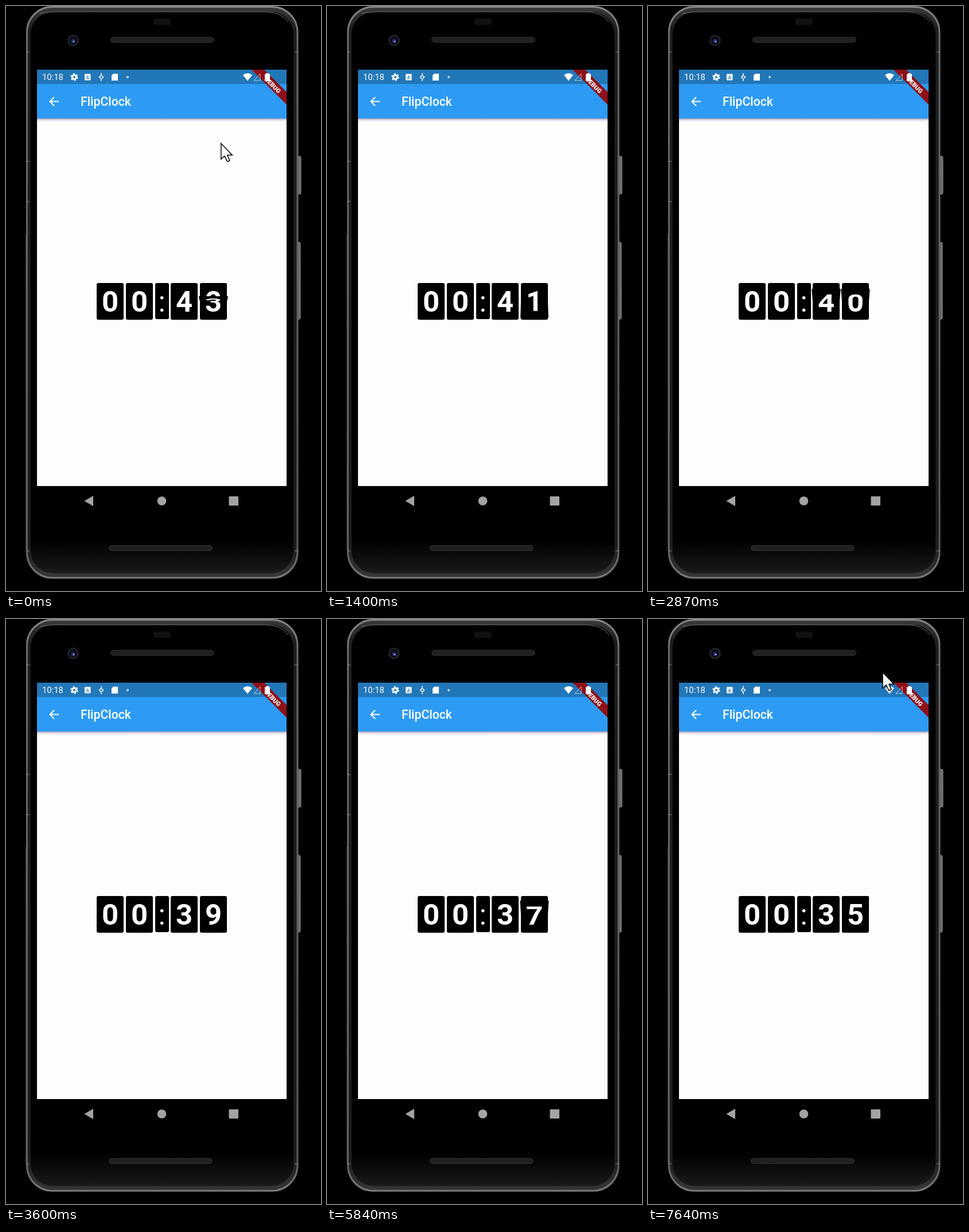
An HTML page for the animation above (7680 ms loop, 549 by 1020 pixels).

```html
<!DOCTYPE html>
<html lang="en">
<head>
<meta charset="utf-8">
<title>FlipClock</title>
<style>
  html, body { margin: 0; width: 100%; height: 100%; overflow: hidden; background: #000; }
  #stage { position: absolute; left: 0; top: 0; width: 549px; height: 1020px; overflow: hidden; }
  svg { position: absolute; left: 0; top: 0; }
  svg text { font-family: Roboto, sans-serif; fill: #fff; }
  .card { position: absolute; top: 483px; width: 47px; height: 64px; }
  .card.colon { width: 23.5px; }
  .half {
    position: absolute; left: 0; width: 100%; height: 32px; overflow: hidden;
    background: #000; color: #fff; text-align: center;
    font: bold 50.8px/66px Roboto, sans-serif;
  }
  .half span { display: block; }
  .top { top: 0; border-radius: 3px 3px 0 0; transform-origin: 50% 100%; }
  .bottom { top: 32px; border-radius: 0 0 3px 3px; transform-origin: 50% 0; }
  .bottom span { margin-top: -32px; }
  .colon .half { font-weight: 400; }
  .colon .bottom { height: 31px; }
</style>
</head>
<body>
<div id="stage">
  <svg width="549" height="1020" viewBox="0 0 549 1020">
    <defs>
      <linearGradient id="rim" x1="0" y1="0" x2="0" y2="1">
        <stop offset="0" stop-color="#868686"/>
        <stop offset=".06" stop-color="#6a6a6a"/>
        <stop offset=".5" stop-color="#626264"/>
        <stop offset=".94" stop-color="#5c5c5c"/>
        <stop offset="1" stop-color="#7a7a7a"/>
      </linearGradient>
      <linearGradient id="body" x1="0" y1="0" x2="0" y2="1">
        <stop offset="0" stop-color="#3a3a3a"/>
        <stop offset=".04" stop-color="#1c1c1c"/>
        <stop offset=".94" stop-color="#1a1a1a"/>
        <stop offset="1" stop-color="#383838"/>
      </linearGradient>
      <linearGradient id="glass" x1="0" y1="0" x2="0" y2="1">
        <stop offset=".94" stop-color="#000"/>
        <stop offset="1" stop-color="#1a1a1a"/>
      </linearGradient>
      <linearGradient id="shade" x1="0" y1="0" x2="0" y2="1">
        <stop offset="0" stop-color="#9a95b4"/>
        <stop offset=".4" stop-color="#dcd8e4"/>
        <stop offset="1" stop-color="#fdfdfb"/>
      </linearGradient>
      <clipPath id="screen"><path d="M54 111H489V837H54Z"/></clipPath>
    </defs>

    <!-- phone -->
    <g fill="#6c6c70" stroke="#8a8a8c" stroke-width="1">
      <rect x="507" y="262" width="7" height="66" rx="2"/>
      <rect x="507" y="412" width="6" height="134" rx="2"/>
    </g>
    <rect x="36.500" y="1.500" width="471.500" height="995.500" rx="44" fill="url(#body)" stroke="url(#rim)" stroke-width="3"/>
    <rect x="42" y="10" width="460" height="979" rx="40" fill="url(#glass)" stroke="#2a2a2a"/>
    <path d="M60 13Q75 10 95 10H450Q480 10 492 28" fill="none" stroke="#707070"/>
    <path d="M35 80h6M35 271h6M35 341h6M35 950h6M503 80h6M503 950h6" stroke="#888"/>
    <path d="M35 397V950" stroke="#666"/>
    <rect x="257" y="22" width="30" height="11" rx="3" fill="#111114"/>
    <g fill="#202020" stroke="#303030">
      <rect x="182.500" y="54.500" width="180" height="9" rx="4.500"/>
      <rect x="179.500" y="940.500" width="180" height="9" rx="4.500"/>
    </g>
    <circle cx="117" cy="60" r="10" fill="#222226"/>
    <circle cx="117" cy="60" r="7" fill="#0a0a18"/>
    <circle cx="117" cy="61" r="3.500" fill="#2a2c70"/>
    <circle cx="118" cy="62" r="1.200" fill="#c4c8ee"/>

    <!-- screen -->
    <g clip-path="url(#screen)">
      <path d="M54 111H489V837H54Z" fill="#fdfdfb"/>
      <path d="M54 111H489V196H54Z" fill="#2d9bf3"/>
      <path d="M54 196H489V202H54Z" fill="url(#shade)"/>
      <path d="M54 111H489V136H54Z" fill="#2277b8"/>
      <path d="M428 111H450L489 150V172Z" fill="#8e1019"/>
      <text x="465" y="142" transform="rotate(45 465 138)" text-anchor="middle" font-size="10.800" font-weight="900">DEBUG</text>
    </g>
    <path d="M92 166.500H77M84 159l-7.500 7.500 7.500 7.500" fill="none" stroke="#fff" stroke-width="2"/>
    <text x="130" y="174" font-size="21.200" font-weight="500">FlipClock</text>

    <!-- status bar -->
    <text x="63" y="129" font-size="14.800">10:18</text>
    <g fill="none" stroke="#fff">
      <circle cx="119" cy="124" r="3.500" stroke-width="3"/>
      <circle cx="119" cy="124" r="5.500" stroke-width="2.400" stroke-dasharray="2.880"/>
      <path d="M166 117v4M166 127v4M166 121l3.500 3-3.500 3-3.500-3Z" stroke-width="1.500"/>
      <path d="M432 130L443 118V130Z" stroke-opacity=".65"/>
    </g>
    <g fill="#fff">
      <rect x="137" y="118.500" width="10.500" height="11" rx="1"/>
      <path d="M187 118h8v12h-11v-9Z"/>
      <circle cx="212" cy="124" r="1.800"/>
      <path d="M413 120.500Q421 114 429 120.500L421 130.500Z"/>
      <path d="M453.500 117h4v1.500h2.500V131h-9V118.500h2.500Z"/>
    </g>
    <path d="M140 127.500l2.300-6 2.300 6M140.800 126h3" fill="none" stroke="#2277b8"/>

    <!-- navigation -->
    <g fill="#a3a3a3">
      <path d="M136.500 863L152 854V872Z"/>
      <circle cx="271.500" cy="863" r="7.800"/>
      <rect x="388.500" y="855" width="16.500" height="16" rx="1"/>
    </g>
  </svg>

  <div id="clock"></div>

  <svg width="549" height="1020">
    <path id="cursor" d="M0 0V27.500L6 22L11 32L15 30L11 20.500H19.500Z" fill="#fff" stroke="#000" stroke-width="1.500"/>
  </svg>
</div>

<script>
const LOOP = 7680, PERIOD = 1000, PHASE = 450;
const LEAD = 375;          // time already spent in the first flip
const FIRST = 43;          // value shown when the loop starts
const clock = document.getElementById('clock');
const cursor = document.getElementById('cursor');

// [time, x, y] way-points of the two pointer visits
const visits = [
  [[0, 375, 239], [70, 365, 275], [160, 330, 400]],
  [[6380, 150, 760], [6540, 214, 590], [6600, 218, 577], [6900, 235, 540],
   [7300, 350, 240], [7560, 409, 93], [LOOP, 409, 93]]
];

function addHalf(card, side) {
  const half = document.createElement('div');
  const label = document.createElement('span');
  half.className = 'half ' + side;
  half.append(label);
  card.append(half);
  return { el: half, label };
}

function addCard(x, colon) {
  const card = document.createElement('div');
  card.className = colon ? 'card colon' : 'card';
  card.style.left = x + 'px';
  clock.append(card);
  const [top, bottom, topFlap, bottomFlap] =
    ['top', 'bottom', 'top', 'bottom'].map(side => addHalf(card, side));
  return { top, bottom, topFlap, bottomFlap };
}

const setText = (half, text) => {
  if (half.label.textContent !== text) half.label.textContent = text;
};

function setFlap(flap, text, angle) {
  flap.el.style.display = angle === null ? 'none' : 'block';
  if (angle === null) return;
  setText(flap, text);
  flap.el.style.transform = `perspective(353px) rotateX(${angle}deg)`;
}

function drawCard(card, now, next, elapsed) {
  const flipping = now !== next && elapsed < 2 * PHASE;
  const falling = flipping && elapsed < PHASE;
  const angle = elapsed / PHASE * 90;
  setText(card.top, next);
  setText(card.bottom, flipping ? now : next);
  setFlap(card.topFlap, now, falling ? -angle : null);
  setFlap(card.bottomFlap, next, flipping && !falling ? 180 - angle : null);
}

function drawCursor(t) {
  const path = visits.find(p => t >= p[0][0] && t < p[p.length - 1][0]);
  cursor.style.display = path ? '' : 'none';
  if (!path) return;
  const i = path.findIndex(p => p[0] > t);
  const [t0, x0, y0] = path[i - 1], [t1, x1, y1] = path[i];
  const k = (t - t0) / (t1 - t0);
  cursor.setAttribute('transform', `translate(${x0 + (x1 - x0) * k} ${y0 + (y1 - y0) * k})`);
}

const digits = [158, 209, 287, 338].map(x => addCard(x));
drawCard(addCard(260, true), ':', ':', 0);

const format = seconds => String(seconds).padStart(4, '0');

function draw(t) {
  const count = Math.floor((t + LEAD) / PERIOD);
  const elapsed = (t + LEAD) % PERIOD;
  const now = format(FIRST - count), next = format(FIRST - count - 1);
  digits.forEach((card, i) => drawCard(card, now[i], next[i], elapsed));
  drawCursor(t);
}

const start = performance.now();
function tick() {
  draw((performance.now() - start) % LOOP);
  requestAnimationFrame(tick);
}
tick();
</script>
</body>
</html>
```
